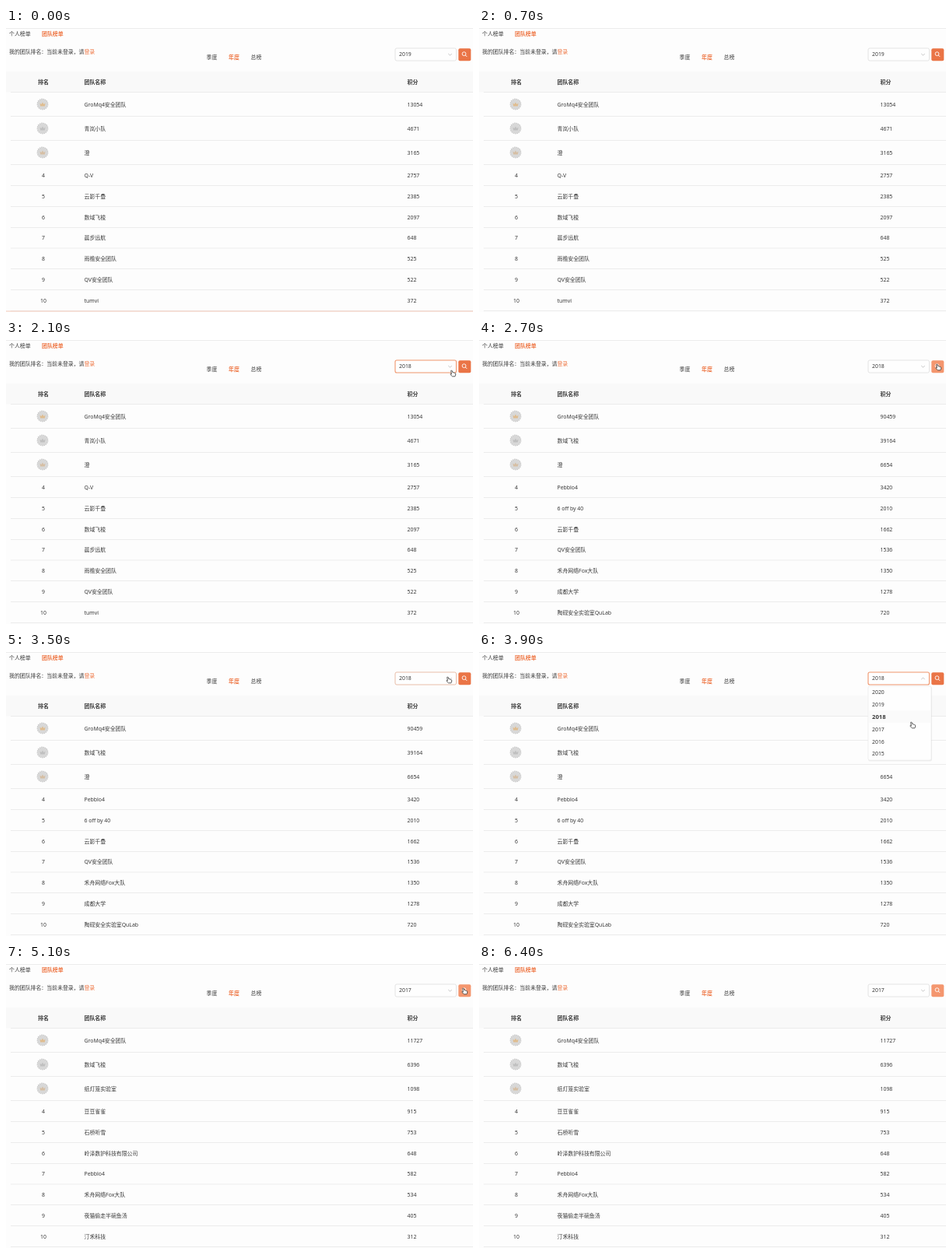
Recreate the animation shown at these times as an HTML page. Size 600 px wide and 365 px high, loop 6.6 s.

```html
<!DOCTYPE html>
<html lang="zh-CN">
<head>
<meta charset="utf-8">
<style>
  html, body { margin: 0; width: 100%; height: 100%; overflow: hidden; background: #fdfdfd; }
  svg { display: block; width: 100vw; height: 100vh; }
  text { font: 6.9px "Noto Sans", "Noto Sans CJK SC", "Noto Sans CJK", sans-serif; fill: #383838; }
  .bold { font-weight: 700; }
  .chosen { font-weight: 700; font-size: 7.7px; }
  .accent { fill: #ee7440; }
  .line { stroke: #e9e9e9; stroke-width: .8; }
</style>
</head>
<body>
<svg id="stage" viewBox="0 0 600 365" preserveAspectRatio="none"></svg>
<script>
const LOOP = 6600;
const stage = document.getElementById('stage');
const rowCentres = [98, 129, 160, 189.5, 216, 243, 269.5, 296.5, 323, 350];
const rowLines = [82.5, 113.5, 144.5, 175.5, 202.5, 229.5, 256.5, 283, 309.5, 336.5, 363.5];
const years = [2020, 2019, 2018, 2017, 2016, 2015];

const rankings = {
  2019: [['GroMq4安全团队', 13054], ['青岚小队', 4671], ['澄', 3165], ['Q-V', 2757], ['云影千叠', 2385],
    ['数域飞梭', 2097], ['晨步远航', 648], ['雨檐安全团队', 525], ['QV安全团队', 522], ['tumvi', 372]],
  2018: [['GroMq4安全团队', 90459], ['数域飞梭', 39164], ['澄', 6654], ['Pebblo4', 3420], ['6 off by 40', 2010],
    ['云影千叠', 1662], ['QV安全团队', 1536], ['禾舟网络Fox大队', 1350], ['成都大学', 1278], ['陶砚安全实验室QuLab', 720]],
  2017: [['GroMq4安全团队', 11727], ['数域飞梭', 6396], ['纸灯笼实验室', 1098], ['豆豆雀雀', 915], ['石桥听雪', 753],
    ['岭泽数护科技有限公司', 648], ['Pebblo4', 582], ['禾舟网络Fox大队', 534], ['夜猫偷走半碗鱼汤', 405], ['汀禾科技', 312]]
};

// y is the vertical centre of the text
const label = (x, y, content, attrs = '') => `<text x="${x}" y="${y + 2.5}" ${attrs}>${content}</text>`;

const medal = (y, colour) => `
  <circle cx="47" cy="${y}" r="6.8" fill="#d8d8d8" stroke="#c8c8c8" stroke-width="1.2" stroke-dasharray="1.5 1"/>
  <path d="M43.5 ${y - 1.5}l2 1.5 1.5-2.5 1.5 2.5 2-1.5-.7 4h-5.6z" fill="${colour}"/>`;

const table = year => `<g id="table${year}">` + rankings[year].map(([team, score], i) =>
  label(100.5, rowCentres[i], team) + label(515.5, rowCentres[i], score)).join('') + '</g>';

stage.innerHTML = `
  <rect width="600" height="365" fill="#fdfdfd"/>
  <path class="line" d="M0 .5H600"/>
  ${label(4, 7.6, '个人榜单')}
  ${label(46, 7.6, '团队榜单', 'class="bold accent"')}
  ${label(4, 30.6, '我的团队排名：当前未登录，请<tspan class="accent">登录</tspan>')}
  ${label(257.5, 37.4, '季度')}
  ${label(286, 37.4, '年度', 'class="bold accent"')}
  ${label(314.5, 37.4, '总榜')}
  <rect y="56" width="600" height="26.5" fill="#f9f9f9"/>
  ${label(48, 69, '排名', 'class="bold" text-anchor="middle"')}
  ${label(100.5, 69, '团队名称', 'class="bold"')}
  ${label(515.5, 69, '积分', 'class="bold"')}
  ${rowLines.map(y => `<path class="line" d="M6 ${y}H600"/>`).join('')}
  <path id="bottomEdge" d="M0 364H600" stroke="#f3c9b8"/>
  ${medal(98, '#dfbd90')}${medal(129, '#c0c0c0')}${medal(160, '#d6bfa4')}
  ${rowCentres.slice(3).map((y, i) => label(48, y, i + 4, 'text-anchor="middle"')).join('')}
  ${Object.keys(rankings).map(table).join('')}
  <rect id="select" x="500" y="26" width="78.5" height="16" rx="2" fill="#fefefe"/>
  ${label(505, 33.8, '', 'id="value"')}
  <path id="chevron" fill="none" stroke="#b5b5b5" stroke-width=".8"/>
  <rect id="button" x="581.3" y="26.2" width="16" height="16" rx="2"/>
  <g fill="none" stroke="#fff" stroke-width=".9"><circle cx="588.5" cy="33.2" r="2.4"/><path d="M590.3 35l2 2"/></g>
  <g id="menu">
    <rect x="500" y="44.5" width="82" height="96" rx="2" fill="#000" opacity=".06"/>
    <rect x="500" y="44" width="81" height="95" rx="2" fill="#fefefe" stroke="#e8e8e8" stroke-width=".6"/>
    <rect id="highlight" x="500.5" width="80" height="15.8" fill="#fafafa"/>
    ${years.map((year, i) => label(505, 51.8 + i * 15.8, year, `id="option${year}"`)).join('')}
  </g>
  <path id="cursor" d="M-2.3 -3.7Q-1.3 -4.4 -.8 -3.3L0 -1.2Q1-1.8 1.5-.9 2.5-1.3 2.8-.3 3.6-.4 3.7 .7L3.6 2.1 2.9 3.8H-.5L-3 1.4Q-3.4 .4-2.4 .4L-1.6 .9z"
    fill="#fff" stroke="#333" stroke-width=".8" stroke-linejoin="round"/>`;

const el = id => document.getElementById(id);
const show = (id, visible) => el(id).setAttribute('display', visible ? 'inline' : 'none');
const clamp = v => Math.max(0, Math.min(1, v));
const mix = (from, to, k) => `rgb(${from.map((v, i) => v + (to[i] - v) * k)})`;

// time, x, y of the pointer
const pointerPath = [
  [1050, 603, 28], [1200, 590, 34], [1400, 569, 36], [1550, 569, 36], [1750, 558, 84], [1900, 558, 84],
  [2100, 574, 43], [2350, 590, 35], [3200, 590, 35], [3450, 569, 36], [3600, 569, 36], [3800, 558, 84],
  [3900, 557, 94], [4050, 557, 99], [4150, 557, 99], [4400, 587, 34], [4550, 589, 35], [5200, 589, 35]
];
const openSpans = [[1500, 1900], [3550, 4150]];
const focusSpans = [[1280, 2450], [3400, 4450]];
const hoverSpans = [[1130, 1360], [2250, 3300], [4390, LOOP]];

function pointerAt(t) {
  const i = pointerPath.findIndex(p => p[0] > t);
  if (i < 1) return null;
  const [t0, x0, y0] = pointerPath[i - 1], [t1, x1, y1] = pointerPath[i];
  const u = (t - t0) / (t1 - t0), k = u * u * (3 - 2 * u);
  return [x0 + (x1 - x0) * k, y0 + (y1 - y0) * k];
}

// 0 to 1, fading over 200 ms at both ends of each span
const fade = (t, spans) => Math.max(...spans.map(([from, to]) =>
  Math.min(clamp((t - from) / 200), 1 - clamp((t - to) / 200))));

function draw(t) {
  const value = t < 1900 ? 2019 : t < 4150 ? 2018 : 2017;
  const shown = t < 2600 ? 2019 : t < 4700 ? 2018 : 2017;
  const open = openSpans.some(([from, to]) => t >= from && t < to);
  const pointer = pointerAt(t), focus = fade(t, focusSpans);

  Object.keys(rankings).forEach(year => show('table' + year, +year === shown));
  el('value').textContent = value;
  el('select').setAttribute('stroke', mix([222, 222, 222], [240, 150, 108], focus));
  el('select').setAttribute('stroke-width', .8 + .3 * focus);
  el('chevron').setAttribute('d', open ? 'M568.3 35.2l2.2-2.2 2.2 2.2' : 'M568.3 33l2.2 2.2 2.2-2.2');
  el('button').setAttribute('fill', mix([234, 116, 70], [244, 150, 110], fade(t, hoverSpans)));

  show('menu', open);
  years.forEach(year => el('option' + year).setAttribute('class', year === value ? 'chosen' : ''));
  el('highlight').setAttribute('y', 43.9 + years.indexOf(value) * 15.8);

  show('bottomEdge', t < 100);
  show('cursor', pointer);
  if (pointer) el('cursor').setAttribute('transform', `translate(${pointer})`);
}

function tick() {
  draw(performance.now() % LOOP);
  requestAnimationFrame(tick);
}
tick();
</script>
</body>
</html>
```
